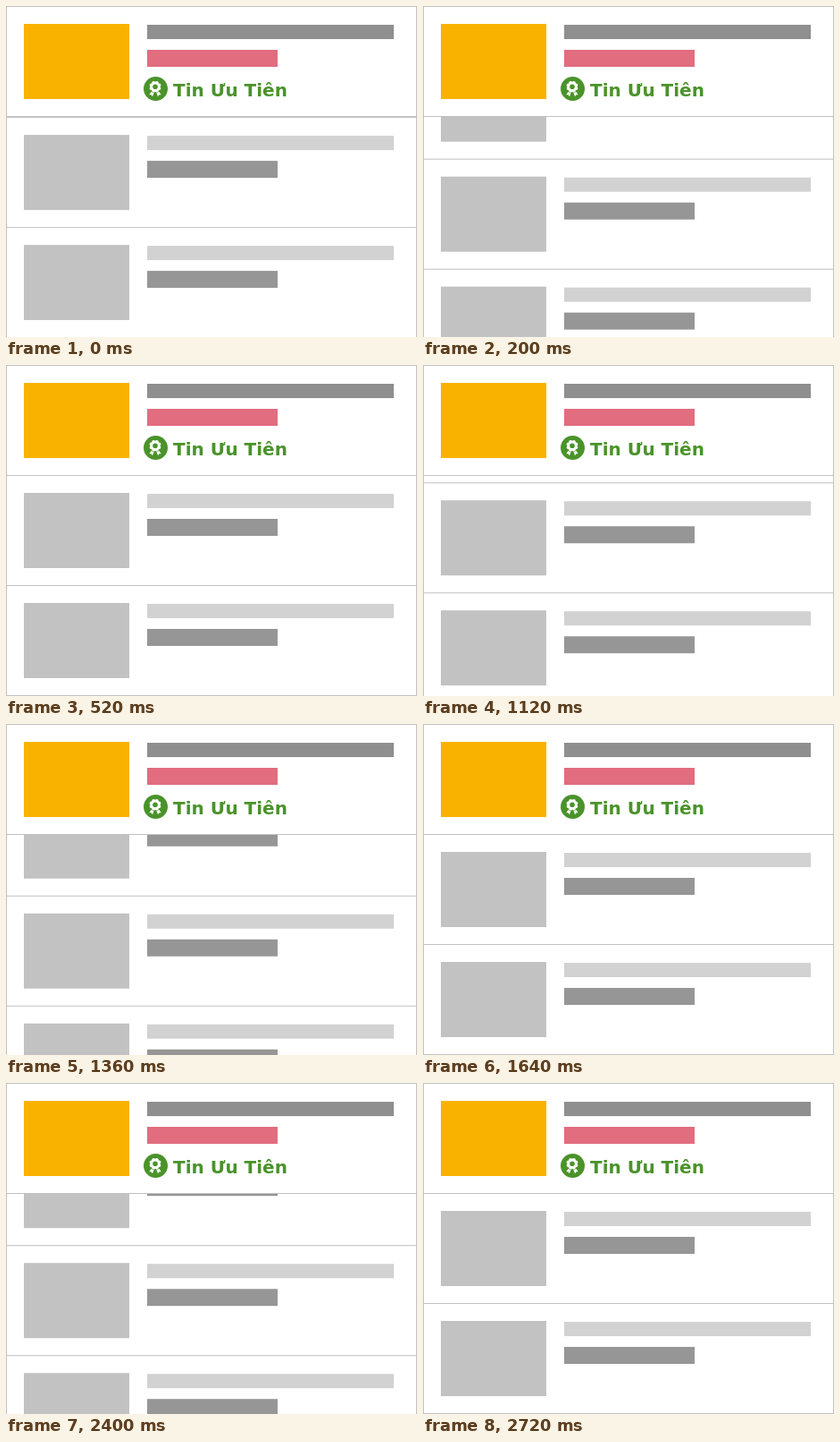
Recreate the animation shown at these times as an HTML page with a canvas. Size 460 px wide and 370 px high, loop 2960 ms.

```html
<!DOCTYPE html>
<html lang="vi">
<head>
<meta charset="utf-8">
<title>Tin Ưu Tiên</title>
<style>
  html, body { margin: 0; width: 100%; height: 100%; overflow: hidden; background: #fff; }
  canvas { display: block; }
</style>
</head>
<body>
<canvas id="stage" width="460" height="370"></canvas>
<script>
const ctx = document.getElementById('stage').getContext('2d');

const W = 460, H = 370, ROW = 123;
const LOOP = 2960, STEP = 40;
const CYCLE = 1080, SLIDE = 533, LEAD = 14;
const LINE = '#c1c1c1', GREEN = '#4a932a';

const PINNED = { box: '#fab200', title: '#8f8f8f', price: '#e16d7f' };
const PLAIN = { box: '#c2c2c2', title: '#d2d2d2', price: '#969696' };

function rect(color, x, y, w, h) {
  ctx.fillStyle = color;
  ctx.fillRect(x, y, w, h);
}

function disc(color, x, y, r) {
  ctx.fillStyle = color;
  ctx.beginPath();
  ctx.arc(x, y, r, 0, Math.PI * 2);
  ctx.fill();
}

// Symmetric bezier ease with handles of length p, solved by bisection
function ease(x, p = 0.125) {
  if (x <= 0) return 0;
  if (x >= 1) return 1;
  let lo = 0, hi = 1;
  for (let i = 0; i < 30; i++) {
    const u = (lo + hi) / 2, v = 1 - u;
    const bx = 3 * v * v * u * p + 3 * v * u * u * (1 - p) + u * u * u;
    if (bx < x) lo = u; else hi = u;
  }
  return lo * lo * (3 - 2 * lo);
}

function drawRow(y, colors) {
  rect(LINE, 0, y, W, 1);
  rect(colors.box, 20, y + 20, 118, 84);
  rect(colors.title, 158, y + 21, 276, 16);
  rect(colors.price, 158, y + 49, 146, 19);
}

function drawBadge(x, y) {
  disc(GREEN, x, y, 13.5);
  const cx = x - 0.5, cy = y - 2.2;
  for (let i = 0; i < 8; i++) {
    const a = (i + 0.5) * Math.PI / 4;
    disc('#fff', cx + 4.6 * Math.cos(a), cy + 4.6 * Math.sin(a), 2.1);
  }
  disc('#fff', cx, cy, 5.2);
  disc(GREEN, cx, cy, 2.8);

  ctx.fillStyle = '#fff';
  for (const side of [-1, 1]) {
    ctx.beginPath();
    for (const [dx, dy] of [[4.6, 6], [1.5, 7.2], [3.1, 11.3], [4.4, 9.2], [6.6, 9.3]]) {
      ctx.lineTo(cx + side * dx, cy + dy - 0.3);
    }
    ctx.fill();
  }
}

function draw(time) {
  const t = Math.floor(time % LOOP / STEP) * STEP;
  const shift = ROW * ease((t % CYCLE + LEAD) / SLIDE);

  rect('#fff', 0, 0, W, H);
  for (let k = 0; k < 4; k++) drawRow(k * ROW + shift, PLAIN);

  // The pinned row covers the list sliding beneath it
  rect('#fff', 0, 0, W, ROW + 1);
  drawRow(0, PINNED);
  rect(LINE, 0, ROW, W, 1);
  drawBadge(167.5, 92.5);
  ctx.fillStyle = GREEN;
  ctx.font = 'bold 20px "DejaVu Sans", sans-serif';
  ctx.fillText('Tin Ưu Tiên', 187, 101);

  rect(LINE, 0, 0, 1, H);
  rect(LINE, W - 1, 0, 1, H);
}

const start = performance.now();
function tick() {
  draw(performance.now() - start);
  requestAnimationFrame(tick);
}
tick();
</script>
</body>
</html>
```
